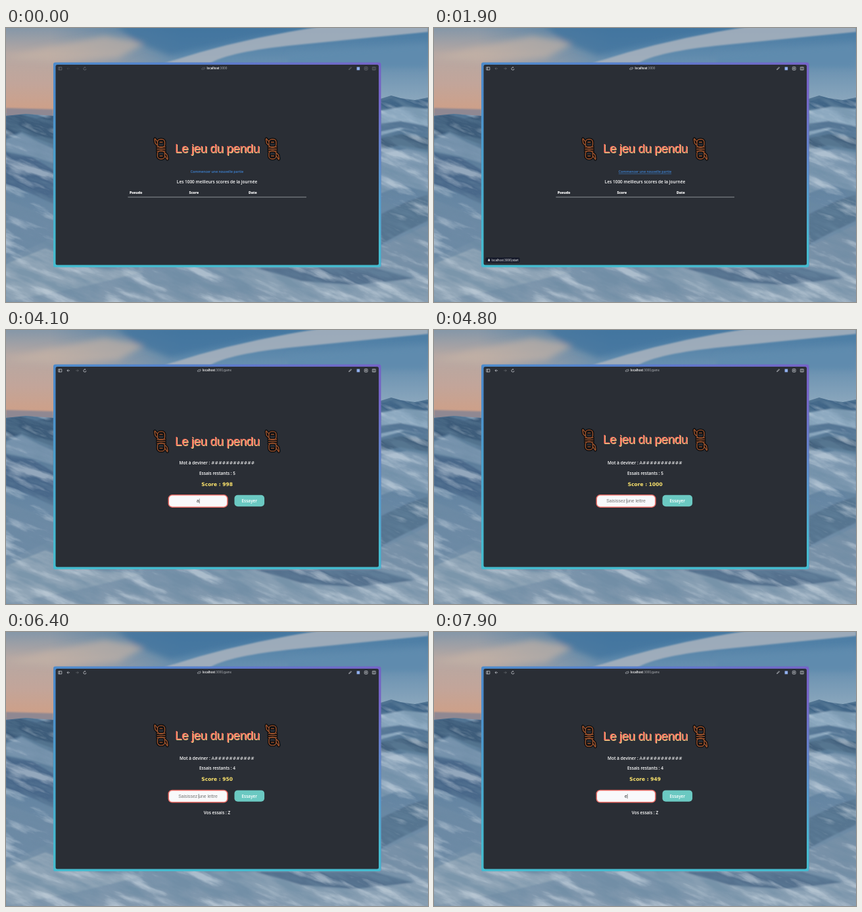
Animation of 642 by 418 pixels, one loop 8 s. Source, as an HTML page:

```html
<!DOCTYPE html>
<html lang="fr">
<head>
<meta charset="utf-8">
<title>Le jeu du pendu</title>
<style>
html, body { margin: 0; width: 100%; height: 100%; overflow: hidden; background: #2a2e35; }
svg { display: block; width: 642px; height: 418px; }
text { font: 600 6.5px "Open Sans", sans-serif; fill: #fff; }
.mid { text-anchor: middle; }
.bold text { font-size: 5.2px; font-weight: 800; }
.hash { font: 6.6px "DejaVu Sans", sans-serif; }
.url { font: 4.3px Inter, sans-serif; }
.title { font: 19px "Liberation Sans", sans-serif; letter-spacing: -.5px; }
.score { font: 700 7.5px "DejaVu Sans", sans-serif; fill: #ffe66d; }
.hint { font: 6.9px "Liberation Sans", sans-serif; fill: #777; }
.icons { fill: none; stroke: #d6d9de; stroke-width: .7; }
.rope { fill: none; stroke-linecap: round; stroke-linejoin: round; }
</style>
</head>
<body>
<svg viewBox="0 0 642 418">
  <defs>
    <linearGradient id="sky" x2="0" y2="1">
      <stop stop-color="#477aa3"/><stop offset=".4" stop-color="#6890b0"/><stop offset=".8" stop-color="#8ba7bd"/>
    </linearGradient>
    <linearGradient id="warm" x2="0" y2="1">
      <stop stop-color="#8597a8"/><stop offset=".3" stop-color="#b6a8a3"/><stop offset=".65" stop-color="#c2a59a"/><stop offset="1" stop-color="#cf9f86"/>
    </linearGradient>
    <linearGradient id="fade"><stop offset=".25" stop-color="#fff"/><stop offset="1" stop-color="#fff" stop-opacity="0"/></linearGradient>
    <mask id="west"><rect width="270" height="130" fill="url(#fade)"/></mask>
    <linearGradient id="snow" x2="0" y2="1">
      <stop stop-color="#4d708f"/><stop offset=".5" stop-color="#6686a3"/><stop offset="1" stop-color="#8299ae"/>
    </linearGradient>
    <linearGradient id="frame">
      <stop stop-color="#4d8bcb"/><stop offset=".45" stop-color="#587fcb"/><stop offset="1" stop-color="#7563c7"/>
    </linearGradient>
    <linearGradient id="teal" x2="0" y2="1">
      <stop offset=".15" stop-color="#45bbcf" stop-opacity="0"/><stop offset=".9" stop-color="#45bbcf"/>
    </linearGradient>
    <filter id="soft" x="-20%" y="-40%" width="140%" height="180%"><feGaussianBlur stdDeviation="5"/></filter>
    <filter id="blur"><feGaussianBlur stdDeviation="1"/></filter>
    <filter id="shade" x="0" y="0" width="100%" height="100%">
      <feTurbulence type="fractalNoise" baseFrequency=".014 .06" numOctaves="5" seed="8"/>
      <feColorMatrix values="0 0 0 0 .14  0 0 0 0 .25  0 0 0 0 .36  4 0 0 0 -2"/>
    </filter>
    <filter id="shine" x="0" y="0" width="100%" height="100%">
      <feTurbulence type="fractalNoise" baseFrequency=".014 .06" numOctaves="5" seed="8"/>
      <feColorMatrix values="0 0 0 0 .72  0 0 0 0 .79  0 0 0 0 .85  -4 0 0 0 1.9"/>
    </filter>
    <clipPath id="ground"><path d="M0 134L30 131 72 134H570V108L586 103 600 107 622 110 642 106V418H0Z"/></clipPath>
    <g id="rope" class="rope">
      <path d="M-9.5-16L-6-12M-10-15L-9-9-6-6M6 11L9.5 16M6 6L9 9 10 15"/>
      <rect x="-5.5" y="-15" width="11" height="12.5" rx="4.5"/>
      <rect x="-5.5" y="2.5" width="11" height="12.5" rx="4.5"/>
      <path d="M-6-3.2H6M-6 0H6M-6 3.2H6M-2-10.5H2M-2 10.5H2"/>
    </g>
    <g id="coil">
      <use href="#rope" stroke="#0b0c0e" stroke-width="4"/>
      <use href="#rope" stroke="#a0552f" stroke-width="1.4"/>
    </g>
  </defs>

  <!-- landscape -->
  <rect width="642" height="140" fill="url(#sky)"/>
  <rect width="270" height="130" fill="url(#warm)" mask="url(#west)"/>
  <g filter="url(#soft)">
    <path d="M60 30L150 12 215 22 170 46 80 52 0 46Z" fill="#c4b3a7" opacity=".65"/>
    <path d="M165-8H470L330 24 250 42 195 20Z" fill="#42759e" opacity=".75"/>
    <path d="M430 40L642 24V60H430Z" fill="#5f8bae"/>
  </g>
  <path d="M240 54Q330 24 430 6T560-6L642-4V6Q540 16 440 26T310 54Z" fill="#aab3be" opacity=".85" filter="url(#blur)"/>
  <path d="M0 122L72 124V137H0Z" fill="#8f8892" filter="url(#blur)"/>
  <g clip-path="url(#ground)">
    <rect y="102" width="642" height="316" fill="url(#snow)"/>
    <g filter="url(#blur)">
      <path d="M0 134L22 132 46 138 72 133V178L46 168 24 158 0 166Z" fill="#3c5c7a"/>
      <path d="M0 170L24 160 50 174 72 184V206L40 196 0 188Z" fill="#7894ae"/>
      <path d="M0 190L40 198 72 216V268L34 250 0 238Z" fill="#48678a"/>
      <path d="M0 262L72 290V320L0 352Z" fill="#6d8aa5"/>
      <path d="M570 112L592 105 618 112 642 108V122L610 126 570 122Z" fill="#3f6587"/>
      <path d="M570 126L605 120 642 124V160L606 154 570 164Z" fill="#8eaac1"/>
      <path d="M570 146L600 142 642 150V160L600 152 570 158Z" fill="#557695"/>
      <path d="M570 168L600 162 642 168V186L600 179 570 184Z" fill="#45647f"/>
      <path d="M570 192L610 184 642 190V250L604 240 570 252Z" fill="#7f9ab2"/>
      <path d="M570 284L612 264 642 254V294L604 312 570 330Z" fill="#567490"/>
      <path d="M570 334L642 300V372L570 366Z" fill="#7891a8"/>
      <path d="M0 360L60 336 130 366 210 372 120 394 0 418Z" fill="#8fa4b6"/>
      <path d="M310 366H400L470 390 560 394 642 376V418H430Z" fill="#879eb2"/>
      <path d="M380 366H560L620 382 530 392 450 386Z" fill="#54718e"/>
    </g>
    <g transform="rotate(22 321 261)" opacity=".5">
      <rect x="-80" y="-60" width="800" height="640" filter="url(#shade)"/>
      <rect x="-80" y="-60" width="800" height="640" filter="url(#shine)"/>
    </g>
  </g>

  <!-- browser window -->
  <rect x="72" y="52.5" width="498.5" height="312.5" rx="3" fill="url(#frame)"/>
  <rect x="72" y="52.5" width="498.5" height="312.5" rx="3" fill="url(#teal)"/>
  <rect x="75.5" y="56" width="491.5" height="305.5" rx="2.5" fill="#2a2e35"/>
  <g id="bar">
    <g class="icons">
      <path d="M79.8 59.8h5v4.2h-5zM81.6 59.8v4.2"/>
      <path id="back" d="M97 61.9h-4m1.6-1.7l-1.7 1.7 1.7 1.7"/>
      <path d="M106.2 61.9h4m-1.6-1.7l1.7 1.7-1.7 1.7" opacity=".35"/>
      <path d="M121.9 62.2a2 2 0 1 1-1-1.8l-1-1.2"/>
      <path d="M521.7 63.6l.5-1.3 2.6-2.6.8.8-2.6 2.6z"/>
      <rect x="545.3" y="59.4" width="4.8" height="4.8" rx="1"/><path d="M547.7 60.4v2.8m-1.4-1.4h2.8"/>
      <path d="M557.4 59.8h4.8v4.2h-4.8zM559.8 59.8v4.2"/>
      <path id="link" d="M-.4.7l-.6.6a.9.9 0 0 1-1.3-1.3l1-1a.9.9 0 0 1 1.3 0M.2-.7l.6-.6A.9.9 0 0 1 2.1 0l-1 1a.9.9 0 0 1-1.3 0"/>
    </g>
  </g>
  <rect x="533.6" y="59.5" width="4.6" height="4.8" fill="#91b0ee"/>
  <text id="url" class="url" y="63.4"><tspan font-weight="600">localhost</tspan><tspan id="path" fill="#b5b8bd"></tspan></text>

  <g id="head">
    <use href="#coil" x="-85.5"/>
    <use href="#coil" x="84"/>
    <text class="title mid" x=".7" y="6.7" style="fill:#ffe08a">Le jeu du pendu</text>
    <text class="title mid" x="-.2" y="5.8" style="fill:#ff6f61">Le jeu du pendu</text>
  </g>

  <g id="home">
    <text id="start" class="mid" x="321" y="221.4" style="font-size:5.2px;fill:#3f86d8">Commencer une nouvelle partie</text>
    <text class="mid" x="321" y="236.5">Les 1000 meilleurs scores de la journée</text>
    <g class="bold">
      <text x="188" y="253.3">Pseudo</text>
      <text x="278.5" y="253.3">Score</text>
      <text x="369" y="253.3">Date</text>
    </g>
    <path d="M185.5 258H457" stroke="#a9acb0" stroke-width=".8"/>
    <g id="status">
      <rect x="78.5" y="350" width="52" height="8" rx="2" fill="#171b2b"/>
      <path d="M82.2 353.6h2.8v2.2h-2.8zM82.8 353.6v-.7a.8.8 0 0 1 1.6 0v.7" fill="#d6d9de"/>
      <text class="url" x="87.5" y="355.5">localhost:3000/start</text>
    </g>
  </g>

  <g id="game">
    <text class="mid" x="321" y="205.3">Mot à deviner : <tspan id="word" class="hash"></tspan></text>
    <text id="tries" class="mid" x="321.5" y="220.8"></text>
    <text id="score" class="score mid" x="321.2" y="237.8"></text>
    <rect x="247.3" y="251.8" width="89.6" height="18.4" rx="5.5" fill="#f9f9fb" stroke="#ee6f68" stroke-width="1.5"/>
    <text id="field" class="hint mid" x="292" y="263.3"></text>
    <path id="caret" d="M294 257.4v7.2" stroke="#444" stroke-width=".6"/>
    <rect x="347.5" y="251.8" width="45.6" height="17.4" rx="5" fill="#6bc9c2"/>
    <text class="mid" x="370.3" y="263.2">Essayer</text>
    <text id="past" class="mid" x="321" y="288.8">Vos essais : Z</text>
  </g>
</svg>
<script>
const $ = id => document.getElementById(id);
const LOOP = 8000, FOCUS = 1000, HOVER = 1200, STATUS = 1400;
const pages = [
  { at: -50, title: 184.7 },
  { at: 2050, title: 169.9, word: '############', tries: 5, score: 1000, typed: 3700, letter: 'a' },
  { at: 4250, title: 169.9, word: 'A###########', tries: 5, score: 1000, typed: 5500, letter: 'z' },
  { at: 5950, title: 159.5, word: 'A###########', tries: 4, score: 950, typed: 7450, letter: 'e', shift: -10.4 }
];
const show = (id, on) => $(id).setAttribute('visibility', on ? 'inherit' : 'hidden');
const move = (id, x, y) => $(id).setAttribute('transform', `translate(${x} ${y})`);

function drawGame(page, t, age) {
  const typing = t >= page.typed;
  move('game', 0, page.shift || 0);
  $('word').textContent = page.word;
  $('tries').textContent = `Essais restants : ${page.tries}`;
  $('score').textContent = `Score : ${page.score - Math.floor(age / 1000)}`;
  $('field').textContent = typing ? page.letter : 'Saisissez une lettre';
  $('field').style.fill = typing ? '#333' : '#777';
  move('caret', typing ? .3 : -.8, 0);
  show('caret', (typing ? t - page.typed : age) % 1200 < 600);
  show('past', page.tries < 5);
}

function draw() {
  const t = performance.now() % LOOP;
  const page = pages.findLast(p => t >= p.at);
  const age = t - page.at, playing = !!page.word;

  // The heading floats up and back every two seconds.
  move('head', 321.5, page.title - 1.95 * (1 - Math.cos(age * Math.PI / 1000)));
  $('bar').setAttribute('opacity', t < FOCUS ? .4 : 1);
  $('back').setAttribute('opacity', playing ? 1 : .35);
  $('url').setAttribute('x', playing ? 299 : 305.5);
  $('path').textContent = playing ? ':3000/game' : ':3000';
  move('link', playing ? 294 : 300.3, 61.9);

  $('home').style.display = playing ? 'none' : '';
  $('game').style.display = playing ? '' : 'none';
  $('start').style.textDecoration = t >= HOVER ? 'underline' : 'none';
  show('status', t >= STATUS);
  if (playing) drawGame(page, t, age);
  requestAnimationFrame(draw);
}
draw();
</script>
</body>
</html>
```
